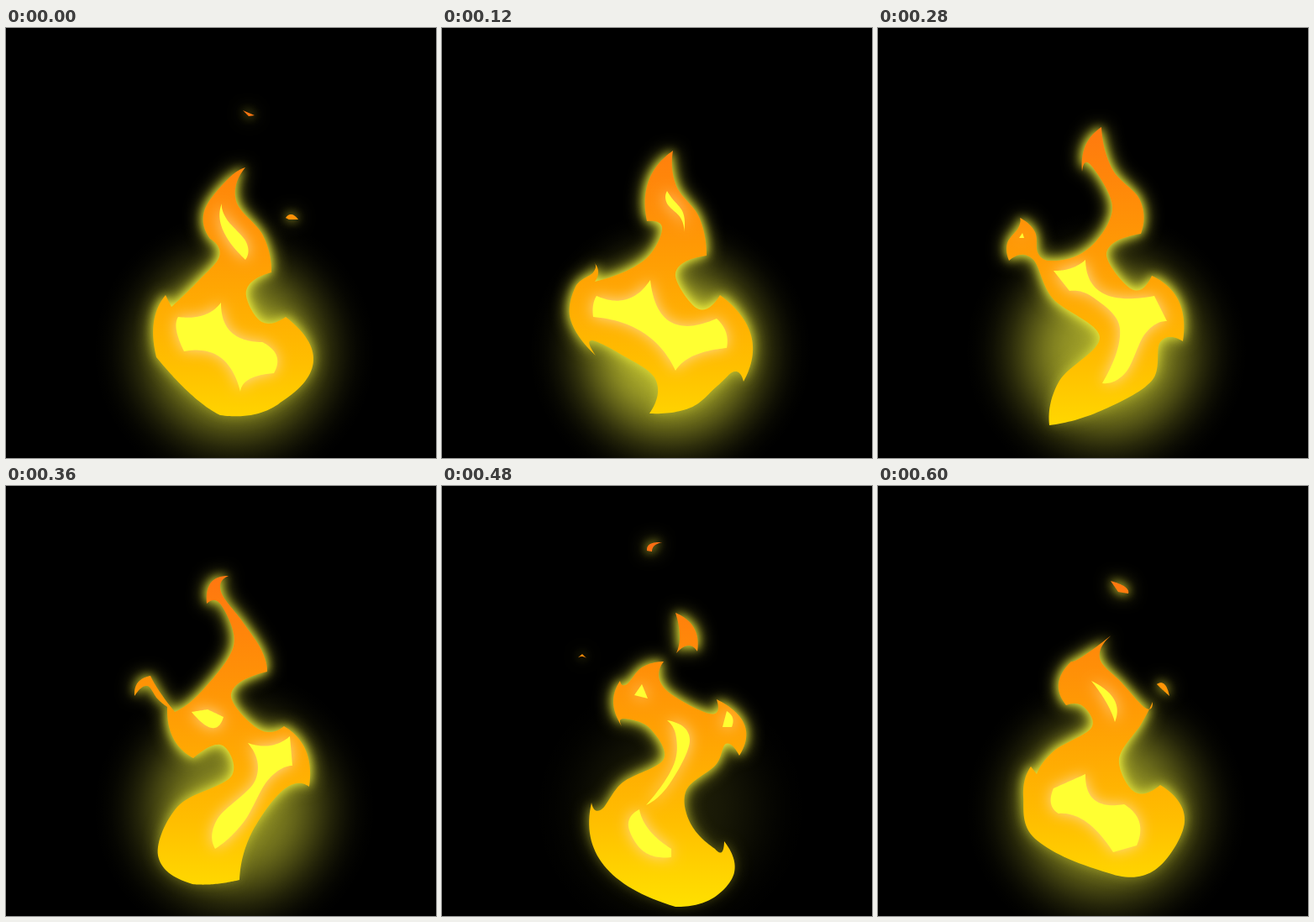
Animation, 512 px wide and 512 px high, one loop 0.64 s. Source, as an HTML page with a canvas:

```html
<!DOCTYPE html>
<html lang="en">
<head>
<meta charset="utf-8">
<title>Flame loop</title>
<style>
  html, body { margin: 0; width: 100%; height: 100%; overflow: hidden; background: #000; }
  canvas { display: block; width: 512px; height: 512px; }
</style>
</head>
<body>
<canvas id="stage" width="512" height="512"></canvas>
<script>
const ctx = document.getElementById('stage').getContext('2d');
const STEP = 40, STEPS = 16, SAMPLES = 48;

// Key points only. A letter marks a sharp corner, plain points are smooth;
// equal letters are matched when two poses blend.
const trunk = `268,248 300,289 C331,286 357,315 R361,358 330,362 292,414 J278,469 248,474
  F222,474 181,440 205,381 268,346 258,309 M223,324 199,300 K192,263`;
const tallStreak = 'A288,306 315,309 Y338,298 X341,333 312,350 283,400 V249,432 252,396 297,350';
const flake = 'N221,269 S240,266 O259,275 245,288';

const poses = [
  { at: 0, glow: .7, outer: {
      body: `T285,166 274,206 306,247 H316,291 286,313 303,349 C333,344 366,396 R328,445 296,460
        F255,461 220,436 L179,392 176,350 W190,318 V197,332 230,300 254,272 B243,251 236,218 262,182`,
      shard: 'N282,98 H296,104 S289,105',
      ember: 'N333,226 340,222 H348,228 S337,228' },
    inner: {
      heart: `A205,344 235,342 Z256,327 268,362 Y305,374 322,390 X319,411 290,418 V279,433 255,392
        U212,385 203,360`,
      streak: 'A257,209 263,228 286,255 V285,276 258,240' } },

  { at: 3, glow: .82, outer: {
      body: `T275,146 279,188 306,225 H315,271 278,292 304,334 C331,318 368,366 R359,421 348,409 328,426
        296,452 F247,459 254,418 212,388 178,372 L183,390 153,347 159,308 180,291 W181,279 186,290
        V182,302 240,277 262,240 B244,230 246,182` },
    inner: {
      heart: `A184,319 220,323 Z248,300 272,350 Y327,346 338,362 X339,381 300,390 V278,408 240,363
        U180,344 180,330`,
      streak: 'A268,194 274,203 287,220 V288,243 284,226 268,209' } },

  { at: 5, glow: 1, outer: {
      body: `T271,135 283,178 312,222 H315,258 274,285 300,326 C324,304 353,338 R365,388 344,381 335,418
        265,465 F222,460 250,402 205,352 173,313 L157,335 153,300 166,267 W163,251 178,272 188,288
        V205,289 256,264 270,215 B245,207 248,167` },
    inner: {
      heart: `A212,299 235,281 Z263,272 283,330 Y327,325 341,345 X343,360 328,378 315,407 V277,431
        262,375 U222,325`,
      streak: 'A289,215 297,224 V293,232',
      dot: 'A266,174 V268,187',
      eye: 'A168,273 O174,291 S163,292' } },

  { at: 7, glow: .72, outer: {
      body: `T266,118 279,168 312,205 H313,245 272,268 302,311 C326,295 358,325 R363,373 336,374 326,420
        265,456 F204,473 216,420 264,368 208,322 184,275 L156,277 154,256 167,238 W169,226 187,243 190,267
        V202,277 250,263 279,215 254,164 B243,171 247,140` },
    inner: {
      heart: `A209,289 230,286 Z247,276 268,316 Y329,319 X344,349 318,364 295,410 V267,423 288,358 258,322
        U228,313`,
      eye: 'A172,244 O174,250 S168,250' } },

  { at: 9, glow: .62, outer: {
      body: `T265,107 256,126 282,162 304,195 H311,221 ${trunk} 180,253 168,238 L153,250 157,234 W172,226
        183,245 V201,269 235,242 271,190 257,143 B239,140 244,115` },
    inner: { heart: tallStreak, flake } },

  // Same pose as above, cut into the pieces that drift apart.
  { at: 9, glow: .62, outer: {
      body: `T258,222 278,230 ${trunk} 203,262 240,238`,
      crown: 'T265,107 257,124 N262,148 251,135 B240,140 244,115',
      shard: 'N262,148 296,180 H311,221 290,223 S268,228 272,188',
      wing: 'L153,250 158,234 W172,226 183,243 K190,260 173,240' },
    inner: { streak: tallStreak, flake } },

  { at: 12, glow: .13, outer: {
      body: `T264,209 265,241 318,271 C327,254 360,284 R354,321 338,307 326,332 291,362 295,400 G325,432
        333,436 D336,423 348,460 322,491 F278,501 193,452 E178,377 190,385 215,353 264,325 247,288 217,277
        M214,286 204,258 K212,232 220,236 238,216`,
      crown: 'T262,67 253,71 N250,78 B244,77 248,69',
      shard: 'N278,151 300,169 H304,197 293,190 S279,199 283,178',
      wing: 'L161,205 W167,200 K173,206 167,203' },
    inner: {
      streak: 'A268,279 295,302 272,353 V243,380 275,334 279,300',
      flake: 'N229,249 S238,236 O245,253',
      heart: 'Z235,385 247,410 X273,432 V273,442 240,435 222,405',
      eye: 'A339,268 346,276 O345,287 S334,287' } },

  { at: 15, glow: .66, outer: {
      body: `T280,176 264,205 290,234 318,264 C327,257 313,284 287,325 305,364 D336,356 365,400 330,457
        F275,461 187,420 173,370 E182,334 O189,343 210,315 254,288 245,263 M224,261 215,235 K230,209
        245,202`,
      shard: 'N277,113 294,120 H298,128 S286,126',
      ember: 'N332,236 341,236 H347,250 S337,241' },
    inner: {
      heart: 'A209,360 Z247,343 258,374 Y293,379 311,400 X308,428 V280,436 248,400 U215,390 206,378',
      streak: 'A254,232 281,254 V282,281 272,258' } }
];

const mix = (a, b, t) => a + (b - a) * t;

// Text to a dense closed outline: a spline that breaks at every corner
// and reaches it along a parabola.
function outline(text) {
  const pts = text.trim().split(/\s+/).map(word => {
    const [, name, x, y] = word.match(/([A-Z]?)(\d+),(\d+)/);
    return { name, x: +x, y: +y };
  });
  const n = pts.length, out = [];
  pts.forEach((p, i) => {
    const q = pts[(i + 1) % n], before = pts[(i + n - 1) % n], after = pts[(i + 2) % n];
    const curve = (k, u) => {
      const d = q[k] - p[k];
      let m = (q[k] - before[k]) / 2, w = (after[k] - p[k]) / 2;
      if (p.name && q.name) m = w = d;
      else if (p.name) m = 2 * d - w;
      else if (q.name) w = 2 * d - m;
      return p[k] + u * (m + u * (3 * d - 2 * m - w + u * (m + w - 2 * d)));
    };
    for (let s = 0; s < 16; s++) {
      out.push({ name: s ? '' : p.name, x: curve('x', s / 16), y: curve('y', s / 16) });
    }
  });
  return out;
}

// Evenly spaced points along the outline from one named corner to another.
function section(line, from, to) {
  const n = line.length, start = line.findIndex(p => p.name === from);
  const part = [line[start]], dist = [0];
  for (let i = 1; i <= n; i++) {
    const p = line[(start + i) % n], last = part[i - 1];
    part.push(p);
    dist.push(dist[i - 1] + Math.hypot(p.x - last.x, p.y - last.y));
    if (p.name === to) break;
  }
  const total = dist[dist.length - 1], out = [];
  for (let s = 0, i = 0; s < SAMPLES; s++) {
    const d = total * s / SAMPLES;
    while (i < part.length - 2 && dist[i + 1] < d) i++;
    const u = (d - dist[i]) / (dist[i + 1] - dist[i] || 1);
    out.push({ x: mix(part[i].x, part[i + 1].x, u), y: mix(part[i].y, part[i + 1].y, u) });
  }
  return out;
}

function shrink(line, size) {
  const cx = line.reduce((sum, p) => sum + p.x, 0) / line.length;
  const cy = line.reduce((sum, p) => sum + p.y, 0) / line.length;
  return line.map(p => ({ x: mix(cx, p.x, size), y: mix(cy, p.y, size) }));
}

function blend(a, b, t) {
  if (!b) return shrink(a, 1 - t);
  if (!a) return shrink(b, t);
  const names = a.map(p => p.name).filter(name => name && b.some(q => q.name === name));
  return names.flatMap((name, i) => {
    const next = names[(i + 1) % names.length], end = section(b, name, next);
    return section(a, name, next).map((p, k) => ({ x: mix(p.x, end[k].x, t), y: mix(p.y, end[k].y, t) }));
  });
}

function layer(from, to, t) {
  const path = new Path2D();
  const names = t ? new Set([...Object.keys(from), ...Object.keys(to)]) : Object.keys(from);
  for (const name of names) {
    const a = from[name] && outline(from[name]);
    const line = t ? blend(a, to[name] && outline(to[name]), t) : a;
    const shape = new Path2D();
    line.forEach(p => shape.lineTo(p.x, p.y));
    shape.closePath();
    path.addPath(shape);
  }
  return path;
}

function poseAt(step) {
  let i = poses.length - 1;
  while (poses[i].at > step) i--;
  // An exact hit on a doubled key uses the whole, uncut pose.
  if (i && poses[i].at === step && poses[i - 1].at === step) i--;
  const a = poses[i], b = poses[i + 1] || a;
  const t = a.at === step ? 0 : (step - a.at) / (b.at - a.at);
  return {
    outer: layer(a.outer, b.outer, t),
    inner: layer(a.inner, b.inner, t),
    glow: mix(a.glow, b.glow, t)
  };
}

function ramp(gradient, stops) {
  stops.forEach(([at, color]) => gradient.addColorStop(at, color));
  return gradient;
}
const light = a => `rgba(255,255,64,${a})`;
const fire = ramp(ctx.createLinearGradient(0, 60, 0, 500), [
  [0, '#ff6c14'], [.27, '#ff860a'], [.48, '#ff9c04'], [.77, '#ffbe00'], [1, '#ffe000']]);
const rim = ramp(ctx.createLinearGradient(0, 60, 0, 500), [
  [0, light(.95)], [.62, light(.8)], [.85, light(.2)], [1, light(.1)]]);

// Soft round light that falls off like a bell.
const halo = ctx.createRadialGradient(272, 385, 0, 272, 385, 168);
for (let r = 0; r <= 1; r += 1 / 16) {
  halo.addColorStop(r, light((.86 * Math.exp(-3.4 * r ** 3) * (1 - r ** 4)).toFixed(3)));
}

function draw({ outer, inner, glow }) {
  ctx.fillStyle = '#000';
  ctx.fillRect(0, 0, 512, 512);

  ctx.globalAlpha = glow;
  ctx.fillStyle = halo;
  ctx.fillRect(0, 0, 512, 512);
  ctx.globalAlpha = 1;

  ctx.fillStyle = rim;
  for (const size of [6, 11]) {
    ctx.filter = `blur(${size}px)`;
    ctx.fill(outer);
  }
  ctx.filter = 'none';

  ctx.fillStyle = fire;
  ctx.fill(outer);

  ctx.save();
  ctx.clip(outer);
  ctx.shadowColor = 'rgb(255,220,150)';
  ctx.shadowBlur = 17;
  ctx.fillStyle = '#ffff32';
  ctx.fill(inner);
  ctx.restore();
}

const frames = Array.from({ length: STEPS }, (_, step) => poseAt(step));
const start = performance.now();
let shown = -1;
function tick() {
  const step = Math.floor((performance.now() - start) / STEP) % STEPS;
  if (step !== shown) draw(frames[shown = step]);
  requestAnimationFrame(tick);
}
tick();
</script>
</body>
</html>
```
